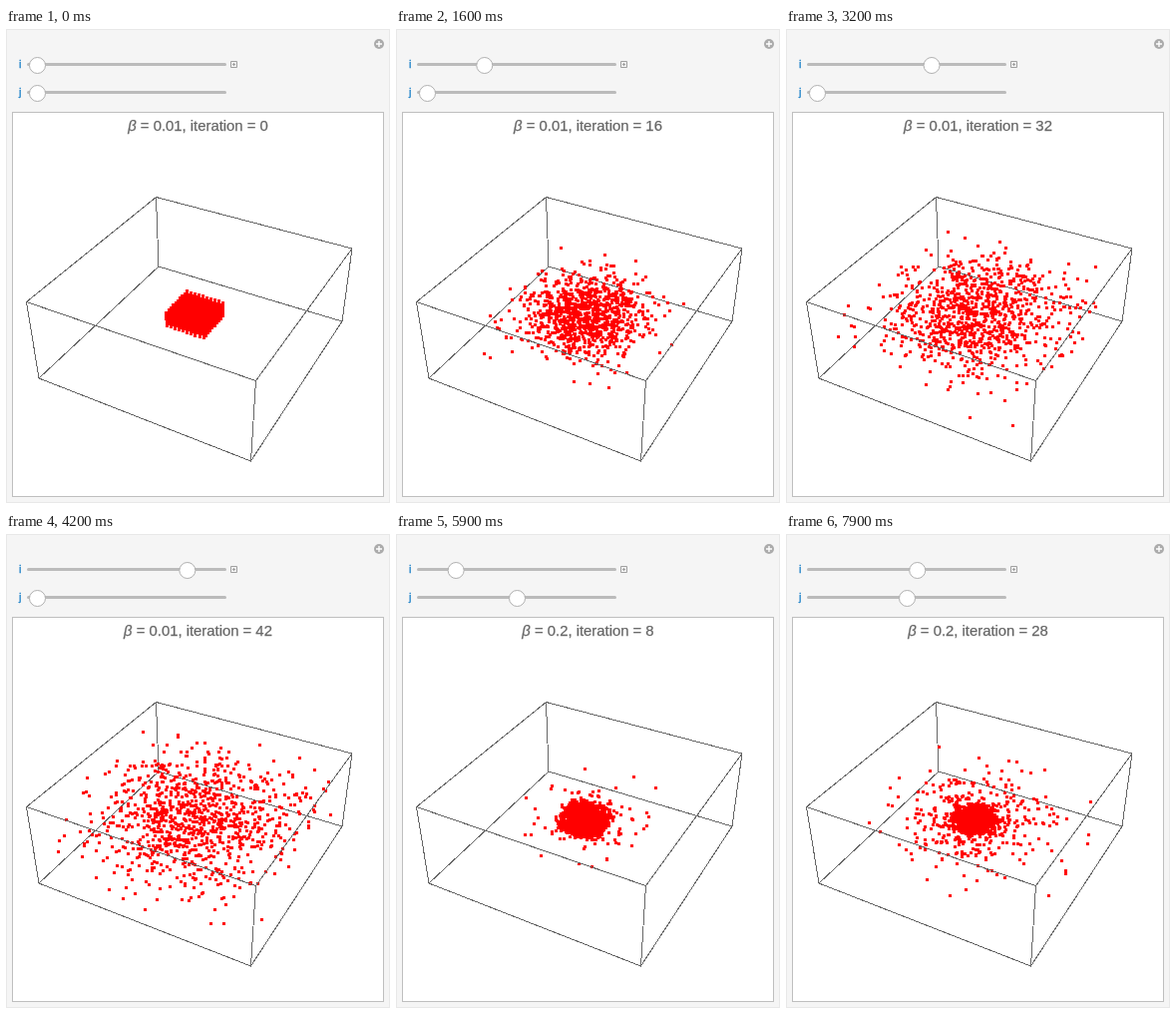
Recreate the animation shown at these times as an HTML page with a canvas. Size 385x478 px, loop 8 s.

```html
<!DOCTYPE html>
<html lang="en">
<head>
<meta charset="utf-8">
<title>Particle diffusion</title>
<style>
  html, body { margin: 0; width: 100%; height: 100%; overflow: hidden; background: #fff; }
  svg, canvas { position: absolute; left: 0; top: 0; width: 385px; height: 478px; }
  text { font-family: "Liberation Sans", Arial, sans-serif; }
  .edge { fill: none; stroke: #666; shape-rendering: crispEdges; }
  .track { stroke: #bbb; stroke-width: 3; stroke-linecap: round; }
  .knob { fill: #fff; stroke: #b0b0b0; }
  .label { font-size: 11px; fill: #1a80c8; stroke: #1a80c8; stroke-width: .3; }
  .title { font-size: 14.85px; fill: #666; stroke: #666; stroke-width: .25; text-anchor: middle; }
</style>
</head>
<body>
<svg viewBox="0 0 385 478">
  <rect x=".5" y="1.5" width="384" height="474" fill="#f5f5f5" stroke="#e8e8e8"/>
  <circle cx="374" cy="16" r="5" fill="#ababab"/>
  <path d="M371 16h6M374 13v6" stroke="#fff" stroke-width="1.4"/>
  <text class="label" x="13" y="40">i</text>
  <text class="label" x="13" y="68">j</text>
  <path class="track" d="M22.5 36.5H219.5M22.5 64.5H219.5"/>
  <path d="M225.5 33.5h6v6h-6zM227 36.5h3M228.5 35v3" fill="none" stroke="#a0a0a0"/>
  <circle class="knob" id="knobI" cx="31.5" cy="37.5" r="8"/>
  <circle class="knob" id="knobJ" cx="31.5" cy="65.5" r="8"/>
  <rect x="6.5" y="84.5" width="372" height="385" fill="#fff" stroke="#bfbfbf"/>
  <text class="title" x="192.5" y="103"><tspan font-style="italic">β</tspan><tspan id="title"> = 0.01, iteration = 0</tspan></text>
  <path class="edge" d="M20.5 274.5L150.5 169.5L347 221L337 294L153 239L33 351L20.5 274.5M150.5 169.5L153 239"/>
</svg>
<canvas id="cloud" width="385" height="478"></canvas>
<svg viewBox="0 0 385 478">
  <path class="edge" d="M20.5 274.5L250.5 353.5L347 221M250.5 353.5L245.5 434M33 351L245.5 434L337 294"/>
</svg>
<script>
const FRAME = 100, FRAMES = 80, SWITCH = 51;
const LIMIT = 24.5, STEP = 5.8;
const $ = id => document.getElementById(id);
const ctx = $('cloud').getContext('2d');

function seeded(s) {
  return () => {
    s = (s + 0x6D2B79F5) | 0;
    let t = Math.imul(s ^ (s >>> 15), 1 | s);
    t = (t + Math.imul(t ^ (t >>> 7), 61 | t)) ^ t;
    return ((t ^ (t >>> 14)) >>> 0) / 4294967296;
  };
}

// Perspective view of the box; each coordinate runs from -25 to 25.
function project([x, y, z]) {
  const u = .5 + x / 50, v = .5 - y / 50, w = .5 - z / 50;
  const d = 1 - .0948 * u - .1834 * v + .065 * w;
  return [
    (150.5 + 164.1 * u - 133.7 * v + 12.95 * w) / d,
    (169.5 + 31.05 * u + 54.75 * v + 85.5 * w) / d
  ];
}

// A 10 x 10 x 10 block, outermost particles first.
function makeBlock(rnd) {
  const block = [];
  for (let n = 0; n < 1000; n++) {
    const home = [n % 10 - 5, Math.floor(n / 10) % 10 - 5, Math.floor(n / 100) - 5];
    const r = Math.hypot(...home.map(c => c + .5));
    block.push({ home, pos: [...home], key: r + rnd() * 1.2 });
  }
  return block.sort((a, b) => b.key - a.key);
}

function walk(c, rnd) {
  const next = c + (rnd() - .5) * STEP;
  return Math.abs(next) > LIMIT ? c : next;
}

// Particles leave the block one by one over "span" steps, then diffuse freely.
function simulate(count, span, seed) {
  const rnd = seeded(seed), block = makeBlock(rnd), frames = [];
  for (let k = 0; k < count; k++) {
    if (k) block.forEach((p, n) => {
      const free = k > n / 1000 * span;
      p.pos = free
        ? p.pos.map(c => walk(c, rnd))
        : p.home.map(c => c + (rnd() - .5) * 1.4);
    });
    frames.push(block.map(p => project(p.pos)));
  }
  return frames;
}

const frames = [...simulate(SWITCH, 8, 11), ...simulate(FRAMES - SWITCH, 58, 29)];
let shown = -1;

function draw(n) {
  const second = n >= SWITCH, step = second ? n - SWITCH : n;
  $('knobI').setAttribute('cx', 31.5 + step * 3.58);
  $('knobJ').setAttribute('cx', second ? 121.5 : 31.5);
  $('title').textContent = ` = ${second ? '0.2' : '0.01'}, iteration = ${step}`;
  ctx.clearRect(0, 0, 385, 478);
  ctx.fillStyle = '#f00';
  for (const [x, y] of frames[n]) ctx.fillRect(Math.floor(x) - 1, Math.floor(y) - 1, 3, 3);
}

function tick() {
  const n = Math.floor(performance.now() / FRAME) % FRAMES;
  if (n !== shown) draw(shown = n);
  requestAnimationFrame(tick);
}
tick();
</script>
</body>
</html>
```
